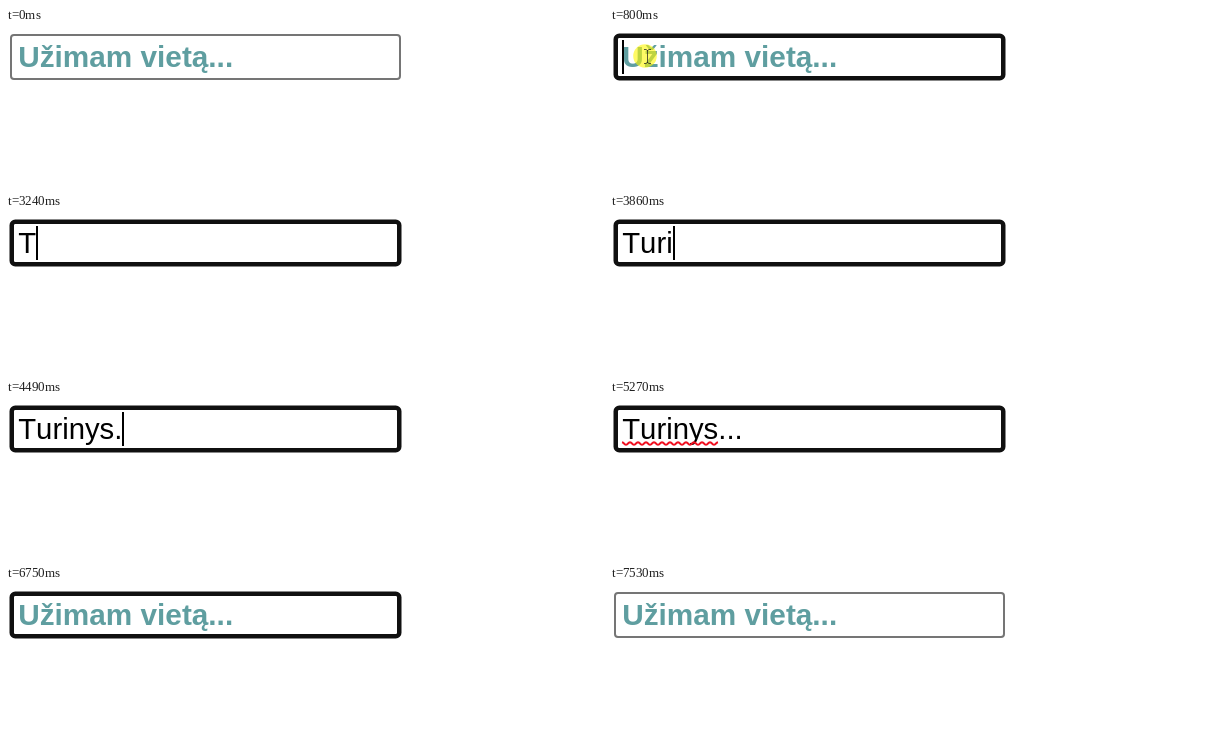
Write an HTML page with a canvas that moves like this. It is 598 px wide and 158 px high and loops after 8000 ms.

```html
<!DOCTYPE html>
<html lang="lt">
<head>
<meta charset="utf-8">
<title>Vietos žymeklis</title>
<style>
html, body { margin: 0; width: 100%; height: 100%; overflow: hidden; background: #fff; }
canvas { display: block; }
</style>
</head>
<body>
<canvas id="stage" width="598" height="158"></canvas>
<script>
const ctx = document.getElementById('stage').getContext('2d', { alpha: false });
const LOOP = 8000;
const LEFT = 12.2, BASE = 39;
const FAMILY = '"Liberation Sans", Arial, sans-serif';
const HINT = 'Užimam vietą...';
const WORD = 'Turinys...';

const FOCUS = 800, SELECT = 5570, CLEAR = 6200, BLUR = 7530;
const keyTimes = [3240, 3560, 3710, 3860, 4010, 4090, 4240, 4490, 4640, 4720];
const caretOff = [[1350, 1900], [2370, 2920], [5270, CLEAR], [6750, 7280]];

const within = (t, a, b) => t >= a && t < b;
const clamp = v => Math.max(0, Math.min(1, v));

function frame(x, y, w, h, line, radius, color) {
  ctx.lineWidth = line;
  ctx.strokeStyle = color;
  ctx.beginPath();
  ctx.roundRect(x + line / 2, y + line / 2, w - line, h - line, radius);
  ctx.stroke();
}

function write(text, font, color) {
  ctx.font = font + ' ' + FAMILY;
  ctx.fontKerning = 'none';
  ctx.fillStyle = color;
  ctx.fillText(text, LEFT, BASE);
  return ctx.measureText(text).width;
}

function squiggle(x0, x1) {
  ctx.strokeStyle = '#f01020';
  ctx.lineWidth = 2;
  ctx.beginPath();
  for (let x = x0; x <= x1; x += 0.5) {
    ctx.lineTo(x, 43.5 - 1.2 * Math.cos((x - x0) * Math.PI / 4));
  }
  ctx.stroke();
}

function pointer(t) {
  if (within(t, FOCUS, 970)) {
    ctx.fillStyle = 'rgba(255, 246, 0, 0.6)';
    ctx.beginPath();
    ctx.arc(35, 28, 11.8, 0, Math.PI * 2);
    ctx.fill();
  }
  const alpha = clamp(Math.min((t - 425) / 300, (1200 - t) / 120));
  if (!within(t, 500, 1200)) return;
  ctx.globalAlpha = alpha * 0.75;
  ctx.strokeStyle = '#222';
  ctx.lineWidth = 1;
  ctx.beginPath();
  for (const [y, d] of [[21.5, 1], [35.5, -1]]) {
    ctx.moveTo(34, y);
    ctx.lineTo(36, y);
    ctx.lineTo(37.5, y + d);
    ctx.lineTo(39, y);
    ctx.lineTo(41, y);
  }
  ctx.moveTo(37.5, 22);
  ctx.lineTo(37.5, 35);
  ctx.stroke();
  ctx.globalAlpha = 1;
}

function draw(t) {
  ctx.fillStyle = '#fff';
  ctx.fillRect(0, 0, 598, 158);

  const focused = within(t, FOCUS, BLUR);
  if (focused) frame(3.5, 5.5, 392, 47, 4.5, 3.5, '#101010');
  else frame(4, 6, 391, 46, 2, 3, '#757575');

  const typed = t < CLEAR ? keyTimes.filter(k => t >= k).length : 0;
  const selected = within(t, SELECT, CLEAR);
  let width = 0;
  if (selected) {
    ctx.fillStyle = '#3390ff';
    ctx.fillRect(12, 12, 120, 34);
  }
  if (typed) width = write(WORD.slice(0, typed), '29.3px', selected ? '#fff' : '#000');
  else write(HINT, 'bold 29.75px', '#5f9ea0');

  if (within(t, 4640, CLEAR)) squiggle(12, 108);
  if (focused && !caretOff.some(([a, b]) => within(t, a, b))) {
    ctx.fillStyle = '#000';
    ctx.fillRect(Math.round(LEFT + width), 12, 2, 34);
  }
  pointer(t);
}

const start = performance.now();
function tick() {
  draw((performance.now() - start) % LOOP);
  requestAnimationFrame(tick);
}
tick();
</script>
</body>
</html>
```
